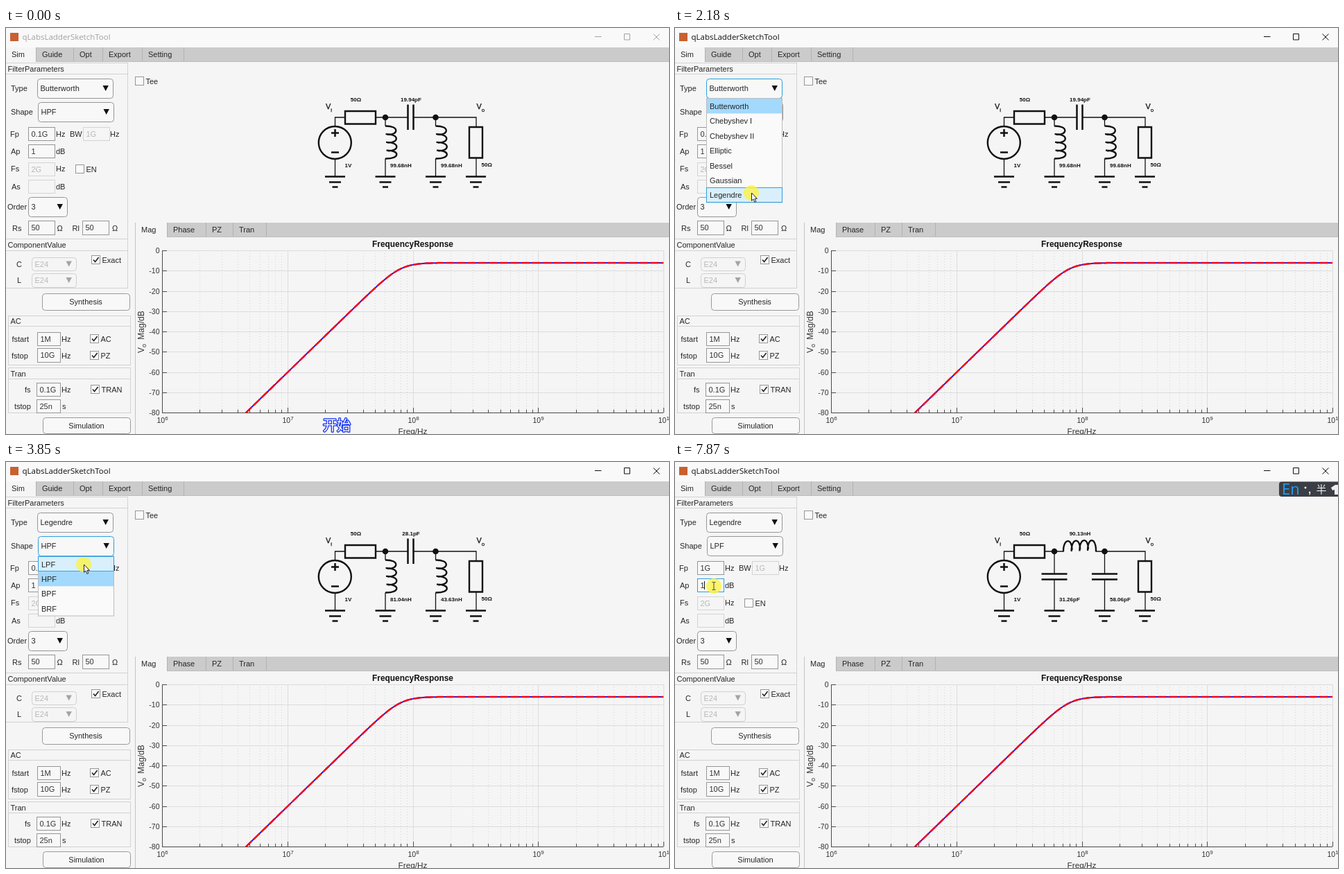
Recreate the animation shown at these times as an HTML page. Size 956 px wide and 586 px high, loop 8 s.

```html
<!DOCTYPE html>
<html lang="en">
<head>
<meta charset="utf-8">
<title>Filter design tool</title>
<style>
html, body { margin: 0; width: 100%; height: 100%; overflow: hidden; background: #f5f5f5; }
svg { display: block; font-family: "Liberation Sans", Arial, sans-serif; font-size: 11px; white-space: pre; }
</style>
</head>
<body>
<svg width="956" height="586" viewBox="0 0 956 586">
  <g id="base"></g>
  <g id="live"></g>
</svg>
<script>
const INK = '#262626', GREY = '#b8b8b8', BLUE = '#2a9fe0', BG = '#f5f5f5';

// drawing helpers: every one returns markup
const box = (x1, y1, x2, y2, fill, stroke = 'none', r = 0) =>
  `<rect x="${x1 + .5}" y="${y1 + .5}" width="${x2 - x1}" height="${y2 - y1}" rx="${r}" fill="${fill}" stroke="${stroke}"/>`;
const fillBox = (x, y, w, h, fill) => `<rect x="${x}" y="${y}" width="${w}" height="${h}" fill="${fill}"/>`;
const path = (d, stroke, width = 1, more = '') =>
  `<path d="${d}" fill="none" stroke="${stroke}" stroke-width="${width}" ${more}/>`;
const text = (x, yMid, s, fill = INK, more = '') =>
  `<text x="${x}" y="${yMid + 4}" fill="${fill}" ${more}>${s}</text>`;
const hLine = (x1, x2, y, c) => path(`M${x1} ${y + .5}H${x2}`, c);
const vLine = (x, y1, y2, c) => path(`M${x + .5} ${y1}V${y2}`, c);

const edit = (x1, y1, x2, y2, s, { off = false, focus = false } = {}) =>
  box(x1, y1, x2, y2, off ? BG : '#f8f8f8', focus ? BLUE : off ? '#d4d4d4' : '#969696') +
  text(x1 + 4.5, (y1 + y2) / 2 + .3, s, off ? GREY : '#333');
const arrow = (x, y, c) => `<path d="M${x - 4} ${y - 4}h8.4l-4.2 8z" fill="${c}"/>`;
const combo = (x1, y1, x2, y2, s, { off = false, focus = false } = {}) => {
  const mid = (y1 + y2) / 2, c = off ? '#a5a5a5' : '#111';
  return box(x1, y1, x2, y2, off ? BG : '#f8f8f8', focus ? BLUE : off ? '#d0d0d0' : '#969696', 4) +
    text(x1 + 4.5, mid, s, off ? GREY : INK) + arrow(x2 - 10.5, mid, c);
};
const check = (x, y, s, on) =>
  box(x, y, x + 12, y + 12, '#fafafa', '#969696') +
  (on ? path(`M${x + 3} ${y + 6.5}l2.6 3 5-6.5`, '#222', 1.6) : '') + text(x + 15.5, y + 6.5, s);
const button = (x1, y1, x2, y2, s) =>
  box(x1, y1, x2, y2, '#f8f8f8', '#9a9a9a', 4) + text((x1 + x2) / 2, (y1 + y2) / 2, s, INK, 'text-anchor="middle"');
const tabs = (x, y, right, names, seps) => {
  let s = fillBox(x, y, right - x, 21, '#cbcbcb') + fillBox(x, y, seps[0] - x, 22, BG);
  seps.forEach(p => s += vLine(p - 1, y, y + 21, '#b2b2b2'));
  names.forEach((n, i) => s += text((i ? seps[i - 1] : x) + 8, y + 10.3, n));
  return s + hLine(seps[0], right, y + 20, '#bdbdbd');
};
const panel = (x1, y1, x2, y2, name, head) =>
  box(x1, y1, x2, y2, 'none', '#d2d2d2') + hLine(x1, x2, y1 + head, '#d2d2d2') + text(x1 + 3.5, y1 + head / 2 + .8, name);

function sidebar() {
  let s = panel(-1, 50, 175, 304, 'FilterParameters', 16) + panel(-1, 304, 175, 375, 'ComponentValue', 17) +
    panel(3, 415, 179, 486, 'AC', 15) + panel(3, 490, 179, 555, 'Tran', 16);
  const labels = [
    [7, 87, 'Type'], [7, 121, 'Shape'], [6, 153, 'Fp'], [72, 153, 'Hz'], [92, 153, 'BW'], [150, 153, 'Hz'],
    [7, 178, 'Ap'], [72, 178, 'dB'], [7, 203, 'Fs'], [72, 203, 'Hz'], [8, 229, 'As'], [72, 229, 'dB'],
    [2, 258, 'Order'], [9, 288.5, 'Rs'], [73.5, 288.5, 'Ω'], [95.5, 288.5, 'Rl'], [153, 288.5, 'Ω'],
    [15, 340.5, 'C'], [16, 364, 'L'], [8.5, 449, 'fstart'], [80, 449, 'Hz'], [8, 472.5, 'fstop'], [80, 472.5, 'Hz'],
    [27, 522, 'fs'], [80, 522, 'Hz'], [12, 546, 'tstop'], [81, 546, 's']];
  labels.forEach(l => s += text(...l));
  const off = { off: true };
  return s + edit(111, 143, 149, 162, '1G', off) + edit(32, 194, 70, 213, '2G', off) + edit(32, 219, 70, 238, '', off) +
    edit(32, 278, 70, 298, '50') + edit(110, 278, 148, 298, '50') +
    edit(45, 439, 78, 458, '1M') + edit(45, 462, 78, 482, '10G') +
    edit(44, 512, 78, 531, '0.1G') + edit(44, 536, 78, 555, '25n') +
    combo(32, 244, 88, 272, '3') + combo(37, 331, 101, 350, 'E24', off) + combo(37, 354, 101, 374, 'E24', off) +
    check(100, 197, 'EN') + check(123, 328, 'Exact', true) + check(121, 442, 'AC', true) +
    check(121, 466, 'PZ', true) + check(122, 515, 'TRAN', true) + check(186, 70, 'Tee') +
    button(52, 383, 178, 407, 'Synthesis') + button(53, 562, 179, 585, 'Simulation');
}

function plot() {
  const L = 225, R = 948, T = 321, B = 555, dec = (R - L) / 4, row = (B - T) / 8;
  const X = e => L + (e - 6) * dec, Y = db => T - db / 80 * (B - T);
  let s = vLine(186, 281, 586, '#c4c4c4'), ticks = '', dots = '';
  for (let i = 0; i <= 8; i++) {
    const y = Math.round(T + i * row);
    s += hLine(L, R, y, '#dcdcdc');
    ticks += `M${L} ${y + .5}h7`;
    s += text(221.5, y + .3, i ? -10 * i : 0, '#333', 'text-anchor="end" font-size="10.5"');
  }
  for (let d = 0; d <= 4; d++) {
    const x = Math.round(X(6 + d));
    s += vLine(x, T, B, '#dcdcdc');
    ticks += `M${x + .5} ${B}v-7`;
    s += text(x - 7.5, 565.5, `10<tspan font-size="8" dy="-4">${6 + d}</tspan>`, '#333', 'font-size="10.5"');
    for (let k = 2; k < 10 && d < 4; k++) {
      const m = Math.round(X(6 + d + Math.log10(k))) + .5;
      dots += `M${m} ${T}V${B}`;
      ticks += `M${m} ${B}v-4`;
    }
  }
  s += path(dots, '#d4d4d4', 1, 'stroke-dasharray="1 3"') +
    path(`M${L + .5} ${T}V${B + .5}H${R}` + ticks, '#4a4a4a');

  // third order high pass, 1 dB ripple at 100 MHz, between equal terminations
  const gain = e => -6.02 - 10 * Math.log10(1 + .2589 * 10 ** (6 * (8 - e)));
  let d = '';
  for (let e = 6.669; e < 10; e += .01) d += (d ? 'L' : 'M') + X(e).toFixed(2) + ' ' + (Y(gain(e)) + .3).toFixed(2);
  d += `L${R} ${Y(-6.02) + .3}`;
  s += path(d, '#3414cc', 2) + path(d, '#f0001e', 2.5, 'stroke-dasharray="12 3.5"');

  return s + text(586.5, 312, 'FrequencyResponse', '#111', 'text-anchor="middle" font-weight="bold" font-size="11.9"') +
    text(586.5, 582, 'Freq/Hz', '#333', 'text-anchor="middle" font-size="11.8"') +
    `<text transform="translate(199 469) rotate(-90)" font-size="12" fill="#333">V<tspan font-size="9" dy="2.5">o</tspan><tspan dx="3" dy="-2.5"> Mag/dB</tspan></text>`;
}

// four-turn coil of length 47 along the y axis, bulging to +x
const coil = place => path('M0 0' + 'c20 -.5 20 13 2.5 12.4m-2 -.7'.repeat(3) + 'c20 -.5 20 12.5 -1.500 11.900',
  '#111', 2.3, `transform="${place}"`);

function circuit(lowPass, series, shunt1, shunt2) {
  const bold = (x, y, s, more = '') => text(x, y, s, '#111', 'font-weight="bold" font-size="8" ' + more);
  const node = (x, sub) => text(x, 113.8, `V<tspan font-size="8" dy="4">${sub}</tspan>`, '#111', 'stroke="#111" stroke-width=".25"');
  let wires = 'M474.5 142V129.5H488M533 129.5H', thick = '';
  wires += lowPass ? '560M607 129.5H678' : '579M588 129.5H678';
  wires += 'V143M678 188V215M474.5 190V215';
  for (const x of [474.5, 547, 619.5, 677.5]) thick += `M${x - 14.5} 215h29M${x - 8.5} 223h17M${x - 4} 230h8`;
  let s = '';
  for (const x of [547, 619.5]) {
    if (lowPass) {
      wires += `M${x} 129V162M${x} 170V215`;
      thick += `M${x - 18.5} 162h37M${x - 18.5} 170h37`;
    } else {
      wires += `M${x} 129V142M${x} 189V215`;
      s += coil(`translate(${x} 142)`);
    }
    s += `<circle cx="${x}" cy="129.5" r="4.3" fill="#111"/>`;
  }
  if (lowPass) s += coil('translate(560 130) rotate(-90) scale(1 1)');
  else thick += 'M579.5 111v36.5M587.5 111v36.5';
  thick += 'M469 152h11M474.5 146.5v11M469 180h11';
  return '<g transform="translate(0 -.5)">' + path(wires, '#111', 1.3) + path(thick, '#111', 2.5) + s +
    path('M489 120.5h44v18.5h-44zM668 143.5h19v44.5h-19z', '#111', 2.4) +
    '<circle cx="474.3" cy="166" r="23.5" fill="none" stroke="#111" stroke-width="2.4"/>' +
    node(461, 'i') + node(678.5, 'o') +
    bold(504.5, 102, '50Ω', 'text-anchor="middle"') + bold(584, 102.6, series, 'text-anchor="middle"') +
    bold(488.5, 197.3, '1V') + bold(554, 197.3, shunt1) + bold(627, 197.3, shunt2) + bold(685.5, 196.8, '50Ω') + '</g>';
}

function titleBar(active) {
  const c = active ? '#111' : '#a2a2a2';
  return fillBox(0, 0, 956, 28, '#f9f9fa') + fillBox(6, 7, 12, 12, '#c9602f') +
    text(23.5, 12.8, 'qLabsLadderSketchTool', c, 'font-size="11.5" font-family="Open Sans, Noto Sans, sans-serif"') +
    path('M849 12.5h9.5M891.5 8.5h8v8.5h-8zM933.5 8.5l9 9M942.5 8.5l-9 9', c);
}

function popup(x1, y1, names, chosen, hover) {
  const h = 21.4, x2 = x1 + 109;
  let s = box(x1, y1, x2, y1 + names.length * h + .5, '#fafafa', '#bcbcbc');
  names.forEach((n, i) => {
    const y = y1 + 1 + i * h;
    if (i === chosen) s += fillBox(x1 + 1, y, 108, 21.4, '#a3d9fd');
    if (i === hover) s += box(x1, Math.round(y - .5), x2, Math.round(y + 20.5), '#d9effb', BLUE);
    s += text(x1 + 5, y + 11, n);
  });
  return s;
}

const inputBar = () =>
  '<path d="M956 28.5H875q-4 0-4 4V46q0 4 4 4H956z" fill="#3b3e45"/>' +
  text(875, 42.5, 'En', '#22a0f2', 'font-size="22" font-family="Open Sans, Noto Sans, sans-serif"') +
  '<circle cx="909" cy="37" r="1.5" fill="#eee"/>' +
  text(913, 41, ',', '#eee', 'font-size="15" font-weight="bold"') +
  text(924.5, 40.5, '半', '#eee', 'font-size="15" font-family="Noto Sans CJK SC, Noto Sans CJK, sans-serif"') +
  '<path d="M956 33h-4l-6 4 2 4 3-1v7h5z" fill="#eee"/>';

const caret = (x, y) => vLine(x, y - 6, y + 6, '#111');
const pointers = {
  arrow: '<path d="M.5 0V11.3L3 9l1.9 4.4 1.9-.8L5 8.3H8.3z" fill="#fff" stroke="#222" stroke-width="1"/>',
  beam: path('M-2.5 -5.5H-.8L0 -5 .8 -5.5H2.5M0 -5V5M-2.5 5.5H-.8L0 5 .8 5.5H2.5', '#444')
};

// [start ms, pointer, x, y, clicking]
const moves = [
  [0], [500, 'arrow', 171, 46], [840, 'arrow', 55, 85], [1160, 'arrow', 58, 84, 1], [1520, 'arrow', 110, 198],
  [1830, 'arrow', 110, 237], [2180, 'arrow', 110, 238, 1], [2500, 'arrow', 126, 171], [2820, 'arrow', 60, 121],
  [3170, 'arrow', 60, 121, 1], [3520, 'arrow', 112, 148], [3850, 'arrow', 112, 148, 1], [4190, 'arrow', 112, 148],
  [4520, 'arrow', 97, 148], [4850, 'beam', 61.5, 154], [5180, 'beam', 53, 150], [5520, 'beam', 51.5, 149.5],
  [5850, 'beam', 50, 148.5], [6200, 'beam', 47, 148], [6550, 'beam', 46.5, 150], [6880],
  [7220, 'beam', 56, 185], [7540, 'beam', 56, 179], [7870, 'beam', 56, 179, 1]];
const types = ['Butterworth', 'Chebyshev I', 'Chebyshev II', 'Elliptic', 'Bessel', 'Gaussian', 'Legendre'];
const shapes = ['LPF', 'HPF', 'BPF', 'BRF'];

function scene([t, pointer, x, y, click]) {
  const within = (a, b) => t >= a && t < b;
  const fp = t < 6880 ? '0.1G' : t < 7220 ? '01G' : '1G';
  let s = titleBar(t >= 500) +
    (t < 2820 ? circuit(false, '19.94pF', '99.68nH', '99.68nH')
      : t < 4850 ? circuit(false, '28.1pF', '81.04nH', '43.63nH')
      : circuit(true, '90.13nH', '31.26pF', '58.06pF')) +
    combo(45, 73, 154, 101, t < 2500 ? 'Butterworth' : 'Legendre', { focus: within(1160, 3170) }) +
    combo(46, 107, 155, 135, t < 4190 ? 'HPF' : 'LPF', { focus: within(3170, 6550) }) +
    edit(32, 143, 70, 162, fp, { focus: within(6550, 7870) }) +
    edit(32, 168, 70, 187, '1', { focus: t >= 7870 });
  if (within(1160, 2500)) s += popup(45, 101, types, 0, t < 1520 ? -1 : t < 1830 ? 4 : 6);
  if (within(3170, 4190)) s += popup(46, 135.5, shapes, 1, t < 3520 ? -1 : 0);
  if (t >= 6550) s += inputBar();
  if (within(6550, 7220)) s += caret(t < 6880 ? 45 : 43, 153);
  if (t >= 7870) s += caret(42, 178);
  if (click) s += `<circle cx="${x}" cy="${y}" r="11" fill="#fbf248" opacity=".8"/>`;
  if (pointer) s += `<g transform="translate(${x} ${y})">${pointers[pointer]}</g>`;
  if (t < 500) s += text(457, 577.3, '开始', '#fff',
    'font-size="20" font-weight="500" stroke="#1a35f0" stroke-width="2.6" stroke-linejoin="round" paint-order="stroke" font-family="Noto Sans CJK SC, Noto Sans CJK, sans-serif"');
  return s;
}

document.getElementById('base').innerHTML = fillBox(0, 0, 956, 586, BG) +
  tabs(0, 28, 956, ['Sim', 'Guide', 'Opt', 'Export', 'Setting'], [44, 98, 140, 197, 257]) + sidebar() +
  tabs(187, 281, 956, ['Mag', 'Phase', 'PZ', 'Tran'], [233, 289, 328, 376]) + plot();

const live = document.getElementById('live');
let shown;
function update(ms) {
  const t = ms % 8000;
  const step = moves.filter(m => m[0] <= t).pop();
  if (step !== shown) live.innerHTML = scene(shown = step);
}
const start = performance.now();
function tick() {
  update(performance.now() - start);
  requestAnimationFrame(tick);
}
tick();
</script>
</body>
</html>
```
